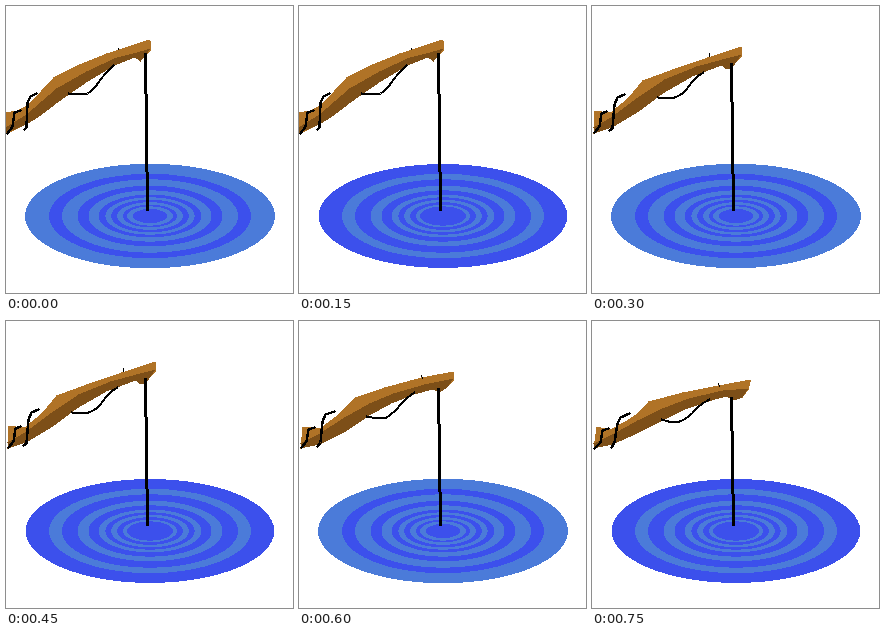
Write an HTML page without scripts that moves like this. It is 287 px wide and 287 px high and loops after 0.9 s.

```html
<!DOCTYPE html>
<html lang="en">
<head>
<meta charset="utf-8">
<title>Fishing rod over rippling water</title>
<style>
  html, body { margin: 0; width: 100%; height: 100%; overflow: hidden; background: #fff; }
  svg { display: block; width: 100vw; height: 100vh; shape-rendering: crispEdges; }

  .light { --c: #4b7bd9; }
  .dark { --c: #3c50ec; }
  .disc { fill: var(--c); }
  .ring { fill: none; stroke: var(--c); }

  .wood { fill: #b07327; }
  .shade { fill: #7d4f18; }
  .cord { fill: none; stroke: #000; stroke-width: 2; stroke-linecap: round; stroke-linejoin: round; }
  .wrap { stroke-width: 2.5; }
  .tick { stroke-width: 1.2; }
  .line { stroke-width: 3; }

  /* water swaps its two colours every 150 ms */
  .calm, .swell { animation: swap 300ms step-end infinite; }
  .swell { animation-delay: -150ms; }
  @keyframes swap { 0% { visibility: visible; } 50%, 100% { visibility: hidden; } }

  /* the rod bends in four hard steps */
  .pose { visibility: hidden; animation: 900ms step-end infinite; }
  .rest { animation-name: rest; }
  .tug { animation-name: tug; }
  .pull { animation-name: pull; }
  .bent { animation-name: bent; }
  @keyframes rest { 0% { visibility: visible; } 33.3333%, 100% { visibility: hidden; } }
  @keyframes tug { 0% { visibility: hidden; } 33.3333% { visibility: visible; } 66.6667%, 100% { visibility: hidden; } }
  @keyframes pull { 0% { visibility: hidden; } 66.6667% { visibility: visible; } 83.3333%, 100% { visibility: hidden; } }
  @keyframes bent { 0% { visibility: hidden; } 83.3333%, 100% { visibility: visible; } }
</style>
</head>
<body>
<svg viewBox="0 0 287 287">
  <defs>
    <g id="rings">
      <circle r="94.5" stroke-width="13"/>
      <circle r="67" stroke-width="11"/>
      <circle r="48" stroke-width="6.5"/>
      <circle r="36" stroke-width="6"/>
      <circle r="25" stroke-width="4"/>
    </g>
  </defs>

  <!-- flattened circles, so the rings get thinner at the top and bottom -->
  <g transform="translate(144 210) scale(1 .418)">
    <g class="calm">
      <circle class="disc light" r="125"/>
      <use class="ring dark" href="#rings"/>
      <circle class="disc dark" r="17"/>
    </g>
    <g class="swell">
      <circle class="disc dark" r="124.3"/>
      <use class="ring light" href="#rings"/>
    </g>
  </g>

  <g transform="translate(.5 .5)">
    <g class="pose rest">
      <path class="wood" d="M-1 106L10 104 20 99 31 89 38 80 47 71 70 59 100 47 143 33 144 35 144 44 139 49 134 55 128 51 108 59 80 76 64 87 50 97 33 110 20 118 3 126 -1 127Z"/>
      <path class="shade" d="M-1 121L20 108 50 82 80 65 110 51 130 46 144 42 139 49 134 55 128 51 108 59 80 76 64 87 50 97 33 110 20 118 -1 127Z"/>
      <path class="cord wrap" d="M1 127L6 120 8 106 14 104M18 123L20 121 21 96 24 90 30 87"/>
      <path class="cord" d="M62 87Q74 89 81 87 87 84 94 73 100 65 107 59"/>
      <path class="cord tick" d="M112 42v1"/>
      <path class="cord line" d="M139 48L141 203"/>
    </g>

    <g class="pose tug">
      <path class="wood" d="M1 104L18 106 30 96 41 85 50 74 80 63 115 51 149 40 149 50 143 57 138 62 134 63 129 59 100 70 72 86 45 106 20 121 1 127Z"/>
      <path class="shade" d="M1 121L20 110 45 91 72 73 104 60 130 53 149 48 143 57 138 62 134 63 129 59 100 70 72 86 45 106 20 121 1 127Z"/>
      <path class="cord wrap" d="M2 126L7 120 9 107 14 105M17 124L20 122 22 98 25 91 32 88"/>
      <path class="cord" d="M65 91Q76 93 82 91 90 89 97 79 102 71 111 66"/>
      <path class="cord tick" d="M117 47v3"/>
      <path class="cord line" d="M139 58L141 203"/>
    </g>

    <g class="pose pull">
      <path class="wood" d="M3 105L20 107 35 96 46 86 55 76 85 66 122 56 154 50 154 59 148 66 140 71 133 68 115 73 92 82 70 94 45 111 20 123 1 127Z"/>
      <path class="shade" d="M1 122L20 112 45 96 70 82 94 72 125 63 154 57 148 66 140 71 133 68 115 73 92 82 70 94 45 111 20 123 1 127Z"/>
      <path class="cord wrap" d="M2 126L7 120 9 108 15 106M18 125L21 121 23 100 26 93 35 90"/>
      <path class="cord" d="M67 95Q80 98 87 96 95 91 102 82 107 76 115 71"/>
      <path class="cord tick" d="M122 54l1 3"/>
      <path class="cord line" d="M139 68L141 203"/>
    </g>

    <g class="pose bent">
      <path class="wood" d="M4 105L18 108 36 98 46 91 56 80 90 71 126 64 158 58 158 60 156 68 150 76 141 79 134 75 119 79 95 87 70 99 45 112 20 123 1 127Z"/>
      <path class="shade" d="M1 122L20 113 45 99 70 87 96 77 130 69 156 67 150 76 141 79 134 75 119 79 95 87 70 99 45 112 20 123 1 127Z"/>
      <path class="cord wrap" d="M2 127L8 121 10 109 16 107M19 126L22 121 25 102 28 96 37 92"/>
      <path class="cord" d="M69 98Q80 102 87 100 96 97 104 87 110 81 117 78"/>
      <path class="cord tick" d="M126 62l1 3"/>
      <path class="cord line" d="M139 77L141 203"/>
    </g>
  </g>
</svg>
</body>
</html>
```
